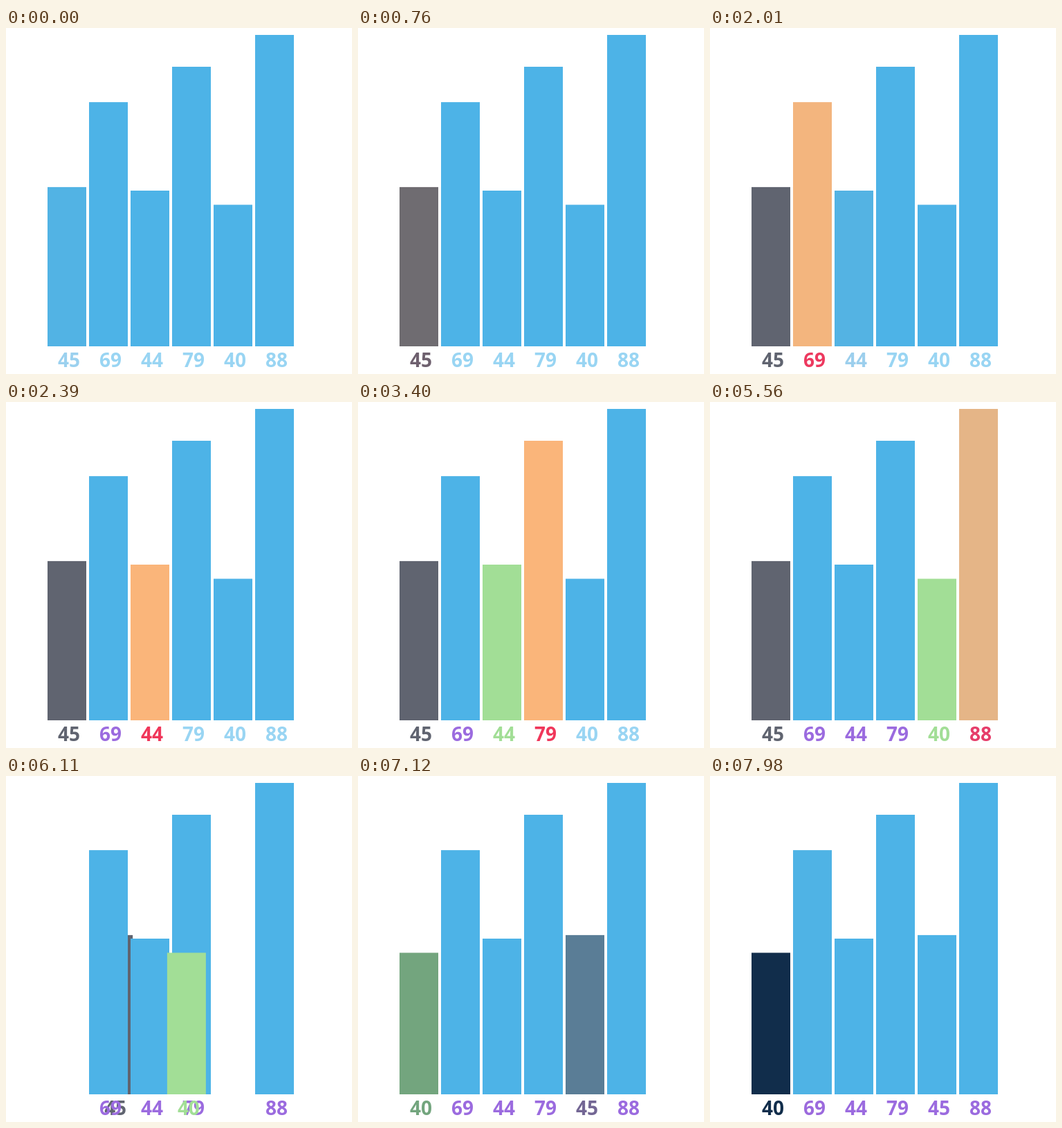
Animation of 500 by 500 pixels, one loop 8000 ms. Source, as an HTML page:

```html
<!DOCTYPE html>
<html lang="en">
<head>
<meta charset="utf-8">
<title>Selection sort</title>
<style>
  html, body { margin: 0; width: 100%; height: 100%; overflow: hidden; background: #fff; }
  svg { display: block; width: 100%; height: 100%; }
  text { font: bold 28px "Open Sans", "Noto Sans", sans-serif; text-anchor: middle; }
</style>
</head>
<body>
<svg viewBox="0 0 500 500"></svg>
<script>
const LOOP = 8000, STEP = 500, FIRST_STEP = -95;
const BASE = 460, UNIT = 450 / 88;

// Each state is [bar colour, label colour].
const STATES = {
  idle:    ['#4db3e7', '#99d5f3'],
  compare: ['#fab57a', '#f0375a'],
  current: ['#606470', '#606470'],
  minimum: ['#a2de96', '#a2de96'],
  checked: ['#4db3e7', '#9b6bdf'],
  sorted:  ['#112d4b', '#112d4b'],
};
const SWAP_STEP = 12;

// "changes" lists [step, state]; "slot" and "target" are places before and after the swap.
const items = [
  { value: 45, slot: 0, target: 4, changes: [[0, 'compare'], [1, 'current'], [14, 'checked']] },
  { value: 69, slot: 1, target: 1, changes: [[2, 'compare'], [4, 'checked'], [16, 'compare']] },
  { value: 44, slot: 2, target: 2, changes: [[4, 'compare'], [5, 'minimum'], [9, 'checked']] },
  { value: 79, slot: 3, target: 3, changes: [[6, 'compare'], [8, 'checked']] },
  { value: 40, slot: 4, target: 0, changes: [[8, 'compare'], [9, 'minimum'], [14, 'sorted']] },
  { value: 88, slot: 5, target: 5, changes: [[10, 'compare'], [11, 'checked']] },
];

const svg = document.querySelector('svg');
function add(tag, attributes) {
  const node = document.createElementNS(svg.namespaceURI, tag);
  for (const name in attributes) node.setAttribute(name, attributes[name]);
  return svg.appendChild(node);
}

for (const item of items) {
  const height = item.value * UNIT;
  item.bar = add('rect', { y: BASE - height, width: 56, height });
}
for (const item of items) {
  item.label = add('text', { y: 490 });
  item.label.textContent = item.value;
}

const cubicInOut = p => p < 0.5 ? 4 * p ** 3 : 1 - 4 * (1 - p) ** 3;

function progress(time, step) {
  const p = (time - FIRST_STEP - step * STEP) / STEP;
  return cubicInOut(Math.min(1, Math.max(0, p)));
}

const channels = hex => [1, 3, 5].map(i => parseInt(hex.slice(i, i + 2), 16));

function mix(from, to, p) {
  const end = channels(to);
  return `rgb(${channels(from).map((c, i) => Math.round(c + (end[i] - c) * p))})`;
}

function draw(time) {
  for (const { bar, label, slot, target, changes } of items) {
    let from = 'idle', to = 'idle', p = 0;
    for (const [step, state] of changes) {
      if (time < FIRST_STEP + step * STEP) break;
      from = to;
      to = state;
      p = progress(time, step);
    }
    const x = 60 + 60 * (slot + (target - slot) * progress(time, SWAP_STEP));
    bar.setAttribute('x', x);
    label.setAttribute('x', x + 31);
    bar.setAttribute('fill', mix(STATES[from][0], STATES[to][0], p));
    label.setAttribute('fill', mix(STATES[from][1], STATES[to][1], p));
  }
}

const start = performance.now();
function tick() {
  draw((performance.now() - start) % LOOP);
  requestAnimationFrame(tick);
}
tick();
</script>
</body>
</html>
```
